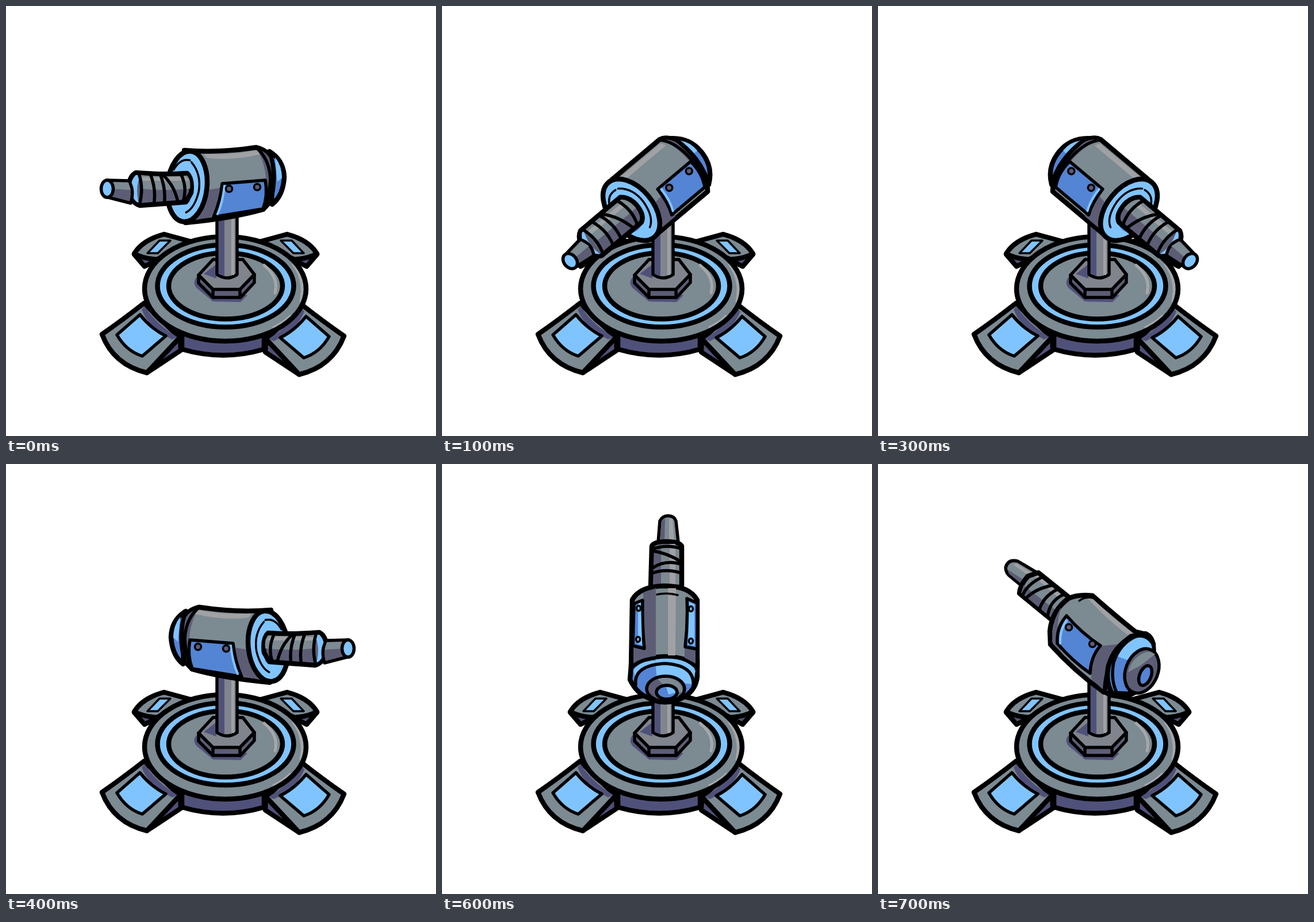
Recreate the animation shown at these times as an HTML page. Size 748 px wide and 748 px high, loop 0.8 s.

```html
<!DOCTYPE html>
<html lang="en">
<head>
<meta charset="utf-8">
<title>Turning turret</title>
<style>
html, body { margin: 0; width: 100%; height: 100%; overflow: hidden; background: #fff; }
svg { display: block; width: 100vw; height: 100vh; }
path, ellipse, circle { fill: none; stroke-linejoin: round; stroke-linecap: round; }
.g { fill: #7c8a92; }
.e { fill: #80848d; }
.d { fill: #5c5d75; }
.s { fill: #50517a; }
.h { fill: #a0a1a4; }
.b { fill: #80c4ff; }
.n { fill: #5484d4; }
.k { stroke: #000; stroke-width: 8.5; }
.m { stroke: #000; stroke-width: 5.5; }
.t { stroke: #000; stroke-width: 3.5; }
.l { stroke: #a5a8ab; stroke-width: 5; }
.w { stroke: #80c4ff; stroke-width: 4; }
.pose { display: none; }
</style>
</head>
<body>
<svg viewBox="0 0 748 748">
<defs>
  <g id="left">
    <path class="n k" d="M458 253Q483 268 484 298Q482 330 463 345Z"/>
    <path class="b" d="M468 263Q480 278 480 299L472 306Z"/>
    <path class="g k" d="M310 251Q370 256 435 246Q452 250 460 262Q471 292 460 340L447 354Q390 370 312 377Z"/>
    <path class="d" d="M436 249Q452 253 458 264Q466 292 457 340L447 351Q462 290 436 249ZM351 320L374 316L361 366L326 373Q347 350 351 320Z"/>
    <path class="h" d="M344 257Q390 260 436 251L442 258Q390 270 349 264Z"/>
    <path class="m" d="M436 247Q458 266 460 300Q458 338 447 354"/>
    <path class="n m" d="M376 309L451 303Q456 330 447 353L361 367Q373 340 376 309Z"/>
    <path class="w" d="M380 313Q377 342 368 362"/>
    <circle class="d t" cx="388" cy="318" r="5.5"/>
    <circle class="d t" cx="437" cy="315" r="5.5"/>
    <g transform="rotate(6 315 314)">
      <ellipse class="b k" cx="315" cy="314" rx="34.500" ry="61.500"/>
      <path class="n" d="M284 300Q302 280 320 292L323 340Q303 350 288 340Z"/>
      <path class="t" d="M289 287Q298 266 315 268M318 271Q338 290 336 321Q332 350 318 359"/>
    </g>
    <path class="d k" d="M226 290Q273 294 315 291Q325 300 322 325L313 341L233 347Q213 340 214 312Q215 296 226 290Z"/>
    <path class="g" d="M234 294Q274 298 315 295Q322 302 320 318Q275 322 237 318Z"/>
    <path class="h" d="M236 298L312 297L318 304L238 304Z"/>
    <path class="b" d="M226 294Q216 303 218 322Q220 338 231 343Q224 316 234 294Z"/>
    <path class="m" d="M231 291Q240 318 232 346M251 292Q262 320 257 346M268 292Q279 320 275 345M273 294Q293 312 299 341M304 292Q316 315 308 341"/>
    <path class="d m" d="M175 303L213 304Q224 319 217 343L178 333Z"/>
    <path class="g" d="M178 306L213 307L217 320L184 318Z"/>
    <ellipse class="b m" cx="176" cy="318" rx="10.5" ry="15"/>
  </g>

  <g id="downLeft" transform="translate(380 312) rotate(-40)">
    <path class="n k" d="M65 -52Q92 -32 92 0Q92 34 65 53Z"/>
    <path class="b" d="M76 -38Q88 -25 88 -5H78Z"/>
    <path class="g k" d="M-66 -62H50Q68 -58 74 -30Q81 10 68 45L56 61H-66Z"/>
    <path class="d" d="M53 -58Q70 -50 71 -28Q78 20 57 57Q76 -10 53 -58ZM-31 18L-5 14L-14 58H-53Q-34 42 -31 18Z"/>
    <path class="h" d="M-48 -56H47L52 -47H-39Z"/>
    <path class="m" d="M50 -61Q69 -42 70 0Q70 42 56 61"/>
    <path class="n m" d="M-8 2H67Q70 30 57 52H-18Q-9 32 -8 2Z"/>
    <path class="w" d="M-3 6Q-4 32 -12 48"/>
    <circle class="d t" cx="9" cy="13" r="5.5"/>
    <circle class="d t" cx="54" cy="13" r="5.5"/>
    <ellipse class="b k" cx="-66" cy="0" rx="38" ry="62"/>
    <path class="n" d="M-100 -15Q-80 -35 -62 -25V28Q-82 42 -98 25Z"/>
    <path class="t" d="M-92 -27Q-83 -47 -65 -44M-60 -43Q-40 -28 -41 3Q-44 35 -61 44"/>
    <path class="d k" d="M-157 -29H-67Q-53 -18 -54 3Q-55 23 -67 28H-157Q-172 20 -172 0Q-172 -22 -157 -29Z"/>
    <path class="g" d="M-150 -25H-68Q-58 -17 -58 3H-149Z"/>
    <path class="h" d="M-149 -20H-70L-65 -12H-147Z"/>
    <path class="b" d="M-157 -25Q-168 -16 -168 0Q-168 17 -157 24Q-164 0 -153 -25Z"/>
    <path class="m" d="M-153 -28Q-143 0 -153 27M-132 -28Q-121 0 -130 27M-115 -28Q-104 0 -112 27M-110 -27Q-90 -5 -84 26M-75 -28Q-64 0 -75 27"/>
    <path class="d m" d="M-205 -14L-168 -18Q-156 0 -167 19L-205 14Z"/>
    <path class="g" d="M-202 -11L-168 -14L-163 1H-196Z"/>
    <ellipse class="b m" cx="-205" cy="0" rx="11" ry="14.5"/>
  </g>

  <g id="down">
    <path class="n k" d="M332 246Q344 215 380 214Q419 216 432 244Z"/>
    <path class="b" d="M369 218Q402 215 425 238L369 232Z"/>
    <path class="g k" d="M326 251Q345 230 381 229Q422 230 436 254L440 370L319 385Z"/>
    <path class="d" d="M329 253Q345 237 369 233V358L323 365ZM411 335L437 348V360L408 354ZM424 241L433 254L411 251Z"/>
    <path class="h" d="M384 233L398 234Q394 295 400 354H384Q388 294 384 233Z"/>
    <path class="n m" d="M329 264L349 251L348 334L327 343Q325 304 329 264Z"/>
    <path class="b" d="M337 263L346 257L345 331L340 333Z"/>
    <path class="n m" d="M409 254L435 268L437 347L412 335Z"/>
    <path class="b" d="M413 259L428 267L430 322L415 331Z"/>
    <circle class="d t" cx="337" cy="273" r="4.5"/>
    <circle class="d t" cx="334" cy="323" r="4.5"/>
    <circle class="d t" cx="424" cy="276" r="4.5"/>
    <circle class="d t" cx="426" cy="325" r="4.5"/>
    <ellipse class="b k" cx="379.500" cy="385" rx="60" ry="30"/>
    <path class="n" d="M352 377L408 379L409 407Q375 417 350 407Z"/>
    <path class="t" d="M363 369Q337 374 335 391Q338 399 348 402M390 370Q425 375 425 390Q422 399 412 401"/>
    <path class="g k" d="M354 393Q362 384 381 384Q403 384 407 393L408 474Q398 487 382 488Q361 486 353 474Z"/>
    <path class="d" d="M358 394Q363 389 373 388V475L357 472Z"/>
    <path class="h" d="M386 388H395V478H386Z"/>
    <path class="b" d="M358 474Q382 464 404 475L397 487H365Z"/>
    <path class="n" d="M358 475L374 468V488H365Z"/>
    <path class="m" d="M355 404Q381 392 406 405M357 409Q385 415 406 434M356 437Q380 425 407 438M355 455Q381 443 408 456M354 475Q380 462 407 475"/>
    <path class="g m" d="M364 481Q380 472 398 482L394 530Q380 546 367 530Z"/>
    <path class="d" d="M367 483L377 480V526L370 527Z"/>
    <path class="h" d="M385 481H391L388 524H384Z"/>
    <ellipse class="b m" cx="380.500" cy="529" rx="13" ry="9"/>
  </g>

  <g id="upRight">
    <path class="g m" d="M488 198L522 178Q539 174 543 189Q543 197 537 203L514 222Z"/>
    <path class="d" d="M510 212L540 192L537 200L515 218Z"/>
    <path class="h" d="M498 198L524 182L530 184L503 203Z"/>
    <path class="g k" d="M430 243L486 198L504 204Q518 219 519 234L463 280Z"/>
    <path class="d" d="M456 263L512 220L516 233L464 276Z"/>
    <path class="h" d="M443 239L487 203L493 205L449 244Z"/>
    <path class="m" d="M442 236Q467 247 470 275M453 227Q478 240 484 262M462 220Q492 226 509 244M480 206Q507 219 514 239"/>
    <path class="n k" d="M286 325Q288 309 300 304L345 319L372 405Q353 416 327 411Q281 390 286 325Z"/>
    <path class="g k" d="M300 305L317 301Q352 273 392 238Q417 235 434 243Q463 265 466 300L465 323Q424 369 372 406Q371 341 325 309Z"/>
    <path class="d" d="M343 322L381 326Q395 345 394 383L374 401Q371 350 343 322ZM446 258Q463 282 462 319L446 336Q459 295 446 258Z"/>
    <path class="h" d="M322 303Q360 274 393 242L402 241Q366 280 331 306Z"/>
    <path class="t" d="M391 242Q405 239 415 247"/>
    <path class="n m" d="M378 325Q410 304 437 273Q455 293 453 321Q428 351 396 373Q395 344 378 325Z"/>
    <path class="w" d="M437 281Q449 298 448 321"/>
    <circle class="d t" cx="392" cy="322" r="5.500"/>
    <circle class="d t" cx="433" cy="293" r="5.500"/>
    <path class="n k" d="M286 322Q299 300 322 309Q354 325 364 360Q370 386 358 408L328 409Z"/>
    <path class="b" d="M290 322Q302 305 322 314Q341 323 350 343L329 351Q313 327 288 330Z"/>
    <path class="m" d="M314 308Q344 320 355 354Q361 385 349 408"/>
    <ellipse class="d m" cx="306" cy="369" rx="28" ry="40" transform="rotate(-22 306 369)"/>
    <path class="g" d="M283 340Q293 331 309 341Q325 351 330 371L309 360Z"/>
    <ellipse class="n m" cx="300" cy="377" rx="10" ry="18" transform="rotate(-22 300 377)"/>
  </g>

  <g id="up">
    <path class="g m" d="M376 136L379 99Q384 90 393 90Q404 90 407 99L411 136Z"/>
    <path class="d" d="M379 134L382 100L388 95L387 134Z"/>
    <path class="h" d="M395 95H401L404 133H395Z"/>
    <path class="g k" d="M363 214L365 143Q368 135 391 135Q413 135 417 143V214Z"/>
    <path class="d" d="M367 211L369 144L381 140V211Z"/>
    <path class="h" d="M396 139H406V211H396Z"/>
    <path class="m" d="M366 148Q390 139 416 147M366 151Q392 155 416 170M366 181Q388 166 416 174M365 190Q390 181 417 190"/>
    <path class="n k" d="M330 339L327 375Q338 398 357 406Q390 424 425 403Q442 390 444 370V340Z"/>
    <path class="g k" d="M331 236Q344 213 386 212Q431 212 444 237V354Q430 336 388 335Q345 336 329 354Z"/>
    <path class="d" d="M350 224L372 216V334Q346 337 333 347V318L352 321ZM422 318L441 321V347L422 337Z"/>
    <path class="h" d="M393 216H407L406 333H393Z"/>
    <path class="t" d="M374 227Q392 223 410 228"/>
    <path class="n m" d="M334 243L349 237Q348 280 352 321L332 316Z"/>
    <path class="b" d="M341 243L346 241L348 315L341 313Z"/>
    <path class="n m" d="M426 234L444 242V322L423 318Q428 276 426 234Z"/>
    <path class="b" d="M430 240L439 244V316L428 314Z"/>
    <ellipse class="b t" cx="342" cy="251" rx="3.500" ry="4.500"/>
    <ellipse class="b t" cx="341" cy="305" rx="3.500" ry="4.500"/>
    <ellipse class="b t" cx="433" cy="252" rx="3.500" ry="4.500"/>
    <ellipse class="b t" cx="433" cy="308" rx="3.500" ry="4.500"/>
    <path class="b" d="M371 340Q425 333 441 360L436 383L374 377Z"/>
    <path class="b" d="M333 359Q344 343 371 341V347Q346 351 336 372Z"/>
    <path class="m" d="M337 384Q333 350 388 347Q440 350 437 386"/>
    <ellipse class="d m" cx="389" cy="391" rx="33" ry="22"/>
    <path class="g" d="M375 374Q397 368 412 380Q420 389 417 398L390 389Z"/>
    <ellipse class="n m" cx="391" cy="397" rx="18" ry="12"/>
    <path class="b" d="M390 388Q405 389 406 398L394 401Z"/>
  </g>

  <g id="backArm">
    <path class="s k" d="M223 432L241 453L270 438L313 409Z"/>
    <path class="g k" d="M275 397L330 412L262 441Q238 439 223 431Q237 407 275 397Z"/>
    <path class="b t" d="M267 408H286L264 430H246Z"/>
  </g>
  <g id="frontArm">
    <path class="s k" d="M303 575L304 599L245 638Z"/>
    <path class="g k" d="M240 517L302 577L245 638Q187 624 167 571Q203 546 240 517Z"/>
    <path class="s" d="M241 522Q259 551 298 576L289 580Q247 559 236 528Z"/>
    <path class="b m" d="M233 537Q252 561 278 574L237 609Q209 600 193 572Z"/>
  </g>
</defs>

<g id="base">
  <use href="#backArm"/>
  <use href="#backArm" transform="translate(764 0) scale(-1 1)"/>
  <path class="s k" d="M306 570V597Q378 618 449 597V570Z"/>
  <use href="#frontArm"/>
  <use href="#frontArm" transform="translate(755 3) scale(-1 1)"/>
  <ellipse class="g" cx="381.500" cy="492" rx="140.500" ry="91"/>
  <path class="l" d="M500 449Q521 478 513 513M466 559Q483 551 494 540"/>
  <ellipse class="k" cx="381.500" cy="492" rx="140.500" ry="91"/>
  <ellipse class="b k" cx="382" cy="487" rx="118.500" ry="71.500"/>
  <ellipse class="g k" cx="382" cy="487" rx="99" ry="57.500"/>
  <path class="l" d="M449 451Q475 472 468 499"/>
  <path class="s" d="M336 469Q322 477 331 490L360 514L408 515L420 503L360 493Z"/>
  <path class="d m" d="M335 468V482L360 507H408L432 481V467Z"/>
  <path class="e m" d="M335 468L360 441H412L432 467L407 493H360Z"/>
  <path class="m" d="M360 493V507M407 493V507"/>
  <path class="s" d="M344 466L366 449V474Z"/>
  <path class="e m" d="M367 365V467Q385 479 402 467V365Z"/>
  <path class="s" d="M370 365H380V470L370 466Z"/>
  <path class="h" d="M392 365H397V468H392Z"/>
</g>

<g class="pose"><use href="#left"/></g>
<g class="pose"><use href="#downLeft"/></g>
<g class="pose"><use href="#down"/></g>
<g class="pose"><use href="#downLeft" transform="translate(766 0) scale(-1 1)"/></g>
<g class="pose"><use href="#left" transform="translate(771 3) scale(-1 1)"/></g>
<g class="pose"><use href="#upRight"/></g>
<g class="pose"><use href="#up"/></g>
<g class="pose"><use href="#upRight" transform="translate(765 -9) scale(-1 1)"/></g>
</svg>
<script>
const STEP = 100;
const poses = [...document.querySelectorAll('.pose')];
const start = performance.now();

function show(now) {
  const time = Math.max(0, now - start);
  const current = Math.floor(time / STEP) % poses.length;
  poses.forEach((pose, i) => { pose.style.display = i === current ? 'inline' : 'none'; });
}

function tick(now) {
  show(now);
  requestAnimationFrame(tick);
}

show(start);
requestAnimationFrame(tick);
</script>
</body>
</html>
```
